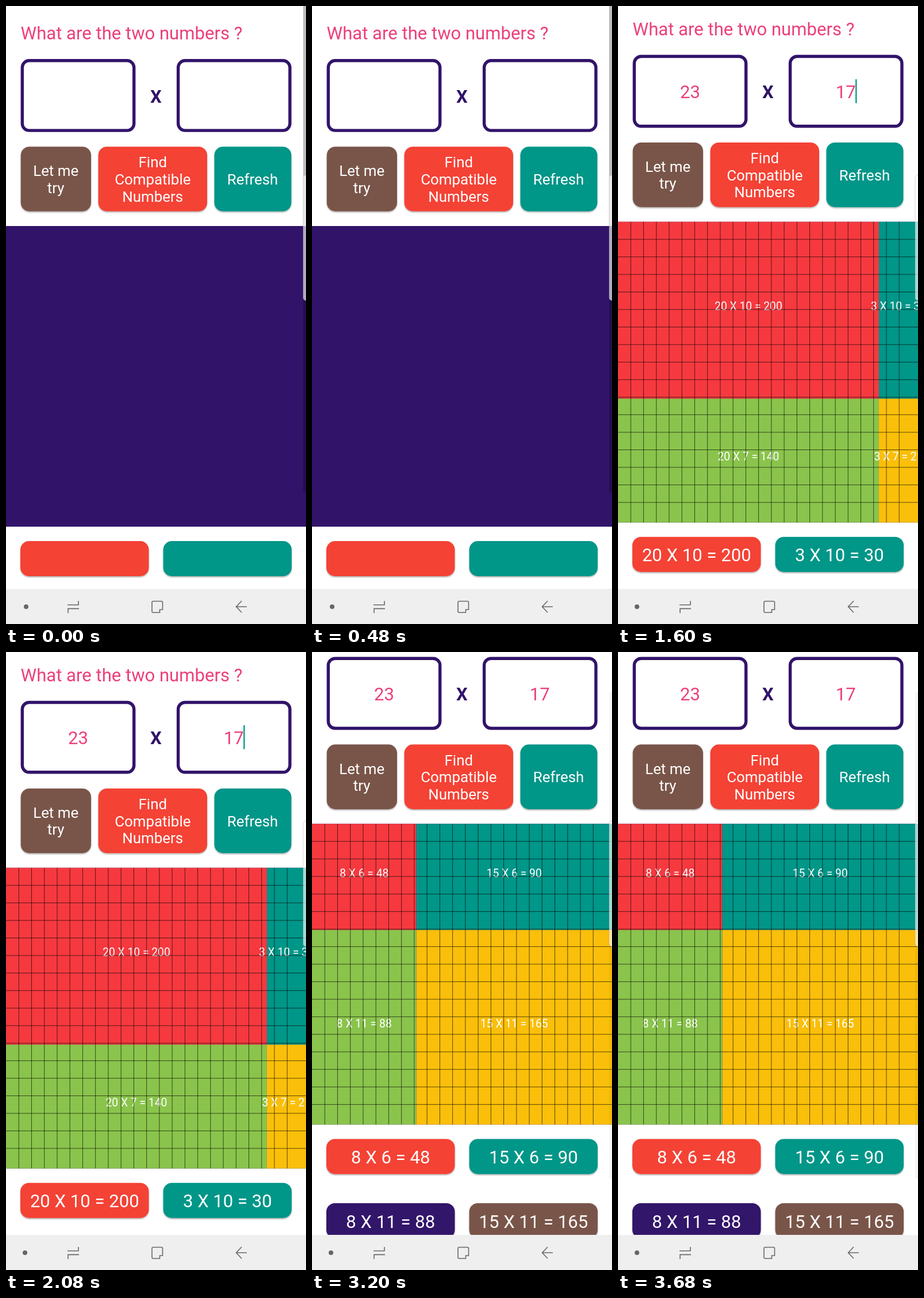
Write an HTML page that moves like this. It is 522 px wide and 1073 px high and loops after 4 s.

```html
<!DOCTYPE html>
<html lang="en">
<head>
<meta charset="utf-8">
<title>Compatible numbers</title>
<style>
html, body { margin: 0; width: 100%; height: 100%; overflow: hidden; background: #fff; }
svg { display: block; width: 100%; height: 100%; }
text { font-family: Roboto, sans-serif; white-space: pre; }
</style>
</head>
<body>
<svg id="stage" viewBox="0 0 522 1073" preserveAspectRatio="none" xmlns="http://www.w3.org/2000/svg">
  <defs>
    <filter id="lift" x="-10%" y="-10%" width="120%" height="130%">
      <feDropShadow dx="0" dy="1.8" stdDeviation="1.3" flood-color="#000" flood-opacity=".32"/>
    </filter>
  </defs>
  <rect width="522" height="1073" fill="#fff"/>
  <g id="page"></g>
  <path id="glow" d="M0 0Q261 50 522 0Z" fill="#000" opacity=".02"/>
  <rect id="bar" x="517" width="5" height="845"/>
  <rect x="517" y="293.5" width="12" height="218" rx="5" fill="#fff" fill-opacity=".65" stroke="#888" stroke-opacity=".4" stroke-width=".8"/>
  <g id="toast">
    <rect x="78" y="873" width="365.5" height="58" rx="29" fill="#585858" fill-opacity=".67"/>
    <text x="260.7" y="910.5" font-size="21" letter-spacing="-.62" text-anchor="middle" fill="#eee">Try finding the numbers on canvas</text>
  </g>
  <rect y="1012" width="522" height="61" fill="#efefef"/>
  <circle id="dot" cy="1043" r="4" fill="#666"/>
  <g fill="none" stroke="#686868" stroke-width="1.6">
    <path d="M107 1039.8H126V1033M127 1046.4H108V1054"/>
    <path d="M267.5 1053H256Q254 1053 254 1051V1035.500Q254 1033.500 256 1033.500H270.500Q272.500 1033.500 272.500 1035.500V1048H267.500Z"/>
    <path d="M410 1033L400.5 1043L410 1053M400.500 1043H419"/>
  </g>
</svg>
<script>
const NS = "http://www.w3.org/2000/svg";
const $ = id => document.getElementById(id);
const SIZE = 522, ROWS = 17, COLS = 23, TOP = 382;
const INK = "#31146a", PINK = "#ec4079", RED = "#f44336", TEAL = "#009688", BROWN = "#795548";
const HOLD = 800;

const scenes = [
  { scroll: 0, bar: .26 },
  { scroll: 0, bar: .26, typed: true, cursor: true, toast: true },
  { scroll: 7.3, bar: 0, typed: true, cursor: true, split: [20, 10], tens: true },
  { scroll: 200.3, bar: 0, typed: true, split: [20, 10], tens: true },
  { scroll: 83.6, bar: .04, typed: true, split: [8, 6] }
];

function add(parent, tag, attrs, content) {
  const el = document.createElementNS(NS, tag);
  for (const key in attrs) el.setAttribute(key, attrs[key]);
  if (content !== undefined) el.textContent = content;
  parent.appendChild(el);
  return el;
}

const rect = (parent, x, y, width, height, fill, extra) =>
  add(parent, "rect", { x, y, width, height, fill, ...extra });

const label = (parent, x, y, size, fill, content, extra) =>
  add(parent, "text", { x, y, "font-size": size, fill, "text-anchor": "middle", ...extra }, content);

const button = (x, y, w, h, fill) =>
  rect(page, x, y, w, h, fill, { rx: 15, filter: "url(#lift)" });

const show = (el, on) => el.setAttribute("visibility", on ? "visible" : "hidden");

const page = $("page");

// Heading and the two inputs
label(page, 25.6, 58, 31.1, PINK, "What are the two numbers ?", { "text-anchor": "start" });
for (const x of [28.3, 299.6])
  rect(page, x, 94.8, 194.4, 121.3, "none", { rx: 12, stroke: INK, "stroke-width": 5.4 });
label(page, 261, 167.5, 31.1, INK, "X", { "font-weight": 700 });
const inputs = [label(page, 125.5, 167.5, 31.1, PINK, "23"), label(page, 396.3, 167.5, 31.1, PINK, "17")];
const cursor = rect(page, 413.2, 134.5, 2.3, 41.5, TEAL);

// Action buttons
const actions = [
  [25.7, 122.3, BROWN, 86.7, ["Let me", "try"]],
  [160.6, 189.4, RED, 255.3, ["Find", "Compatible", "Numbers"]],
  [362.5, 134, TEAL, 429, ["Refresh"]]
];
for (const [x, w, fill, mid, lines] of actions) {
  button(x, 244.2, w, 112.3, fill);
  lines.forEach((line, i) =>
    label(page, mid, 310 + 29.6 * (i - (lines.length - 1) / 2), 25.9, "#fff", line));
}

// Board with four areas under a grid
rect(page, 0, TOP, SIZE, SIZE, INK);
const board = add(page, "g", { transform: `translate(0 ${TOP})` });
const areas = ["#f5393f", TEAL, "#8ac44c", "#fabf0a"].map(fill => rect(board, 0, 0, 0, 0, fill));
const areaTexts = areas.map(() => label(board, 0, 0, 19.3, "#fff", ""));
let grid = "";
for (let i = 1; i < COLS; i++) grid += `M${i * 22.24} 0V${SIZE}`;
for (let i = 1; i < ROWS; i++) grid += `M0 ${i * 30.45}H${SIZE}`;
add(board, "path", { d: grid, fill: "none", stroke: "#000", "stroke-opacity": .8, "stroke-width": .8 });

// Result buttons
const results = [
  [25, 929, 223.5, RED], [273.6, 929, 223.5, TEAL],
  [25, 1040.5, 223.5, INK], [273.6, 1040.5, 223.5, BROWN],
  [63.5, 1139.2, 395.3, RED]
].map(([x, y, w, fill]) => {
  button(x, y, w, 61, fill);
  return label(page, x + w / 2, y + 42.8, 31.1, "#fff", "");
});

function fillBoard({ split, tens }) {
  show(board, split);
  if (!split) {
    results.forEach(el => { el.textContent = ""; });
    return;
  }
  const [a, b] = split;
  const products = [];
  areas.forEach((area, i) => {
    const right = i % 2, low = i > 1;
    const m = right ? COLS - a : a, n = low ? ROWS - b : b;
    const w = m / COLS * SIZE, h = n / ROWS * SIZE;
    const x = right ? SIZE - w : 0, y = low ? SIZE - h : 0;
    const attrs = { x, y, width: w, height: h };
    for (const key in attrs) area.setAttribute(key, attrs[key]);
    const sum = `${m} X ${n} = ${m * n}`;
    areaTexts[i].setAttribute("x", x + w / 2);
    areaTexts[i].setAttribute("y", y + h / 2);
    areaTexts[i].textContent = sum;
    results[i].textContent = tens && i === 2 ? `${n} X ${m} = ${m * n}` : sum;
    products.push(m * n);
  });
  results[4].textContent = `${products.join(" + ")} = ${COLS * ROWS}`;
}

let current = -1;
function render(time) {
  const index = Math.floor(time / HOLD) % scenes.length;
  if (index === current) return;
  current = index;
  const scene = scenes[index];
  page.setAttribute("transform", `translate(0 ${-scene.scroll})`);
  inputs.forEach(el => show(el, scene.typed));
  show(cursor, scene.cursor);
  show($("toast"), scene.toast);
  show($("glow"), scene.toast);
  $("bar").setAttribute("y", scene.scroll * 845 / 1012);
  $("bar").setAttribute("opacity", scene.bar);
  $("dot").setAttribute("cx", scene.typed ? 33 : 35);
  fillBoard(scene);
}

const start = performance.now();
function tick() {
  render(performance.now() - start);
  requestAnimationFrame(tick);
}
tick();
</script>
</body>
</html>
```
